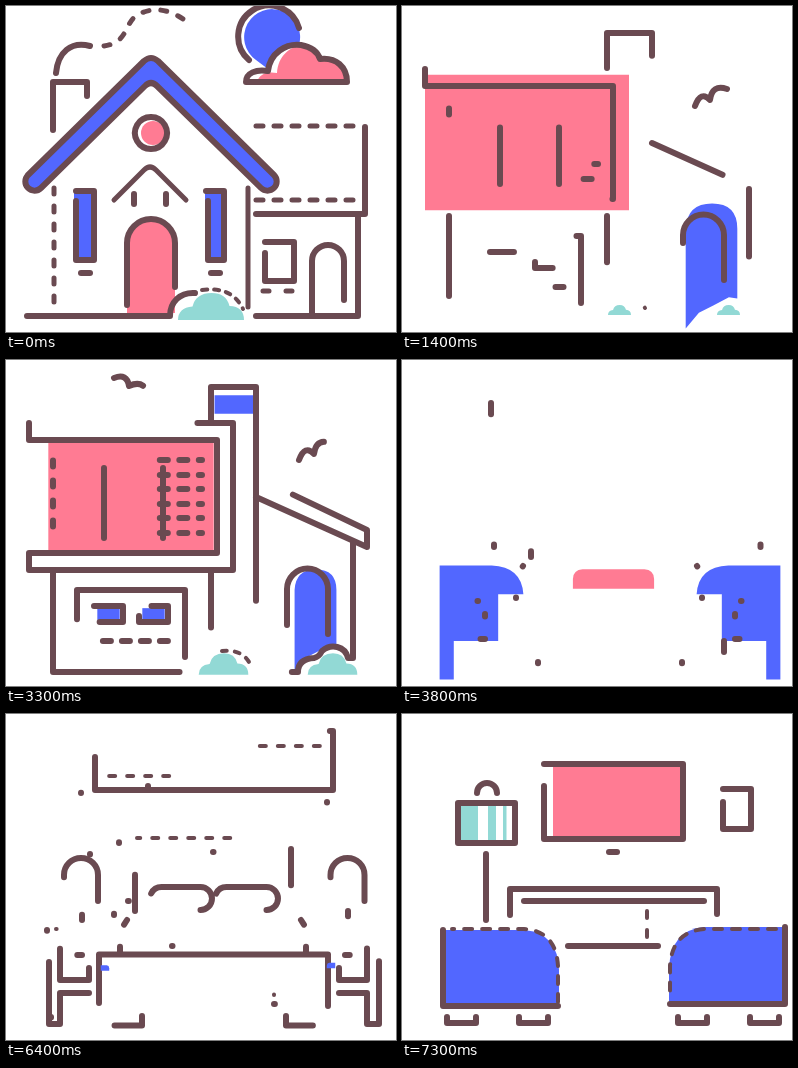
An HTML page for the animation above (8 s loop, 390 px wide and 326 px high).

```html
<!DOCTYPE html>
<html lang="en">
<head>
<meta charset="utf-8">
<title>House and home line drawings</title>
<style>
html, body { margin: 0; height: 100%; overflow: hidden; background: #fff; }
svg { display: block; width: 390px; height: 326px; }
.line { fill: none; stroke: #6a4a51; stroke-width: 6; stroke-linecap: round; stroke-linejoin: round; }
.fill { transform-box: fill-box; transform-origin: center; }
</style>
</head>
<body>
<svg id="stage" viewBox="0 0 390 326"></svg>
<script>
const PINK = '#ff7b93', BLUE = '#5267ff', TEAL = '#92d9d5';
const LOOP = 8000, STEP = 100;

// Fill: colour, path, delay against the scene's fill start
const fill = (color, d, delay = 0) => ({ color, d, delay });
// Line: path ends at the point where the stroke begins to grow
const line = (d, o = {}) => ({ d, delay: 0, dur: 900, w: 6, ...o });
const dashed = (d, on, off, o = {}) => line(d, { w: 5, dash: [on, off], ...o });

const box = (x, y, w, h) => `M${x} ${y}h${w}v${h}h${-w}Z`;
const pill = (x, y, w, h) => {
  const r = h / 2;
  return `M${x + w - r} ${y + h}H${x + r}a${r} ${r} 0 0 1 0 ${-h}H${x + w - r}a${r} ${r} 0 0 1 0 ${h}`;
};
const bush = (x, y, w, h) => {
  const p = (a, b) => `${x + a * w} ${y + b * h}`;
  return `M${p(0, 1)}Q${p(0, .55)} ${p(.22, .5)}Q${p(.27, 0)} ${p(.51, 0)}` +
    `Q${p(.73, 0)} ${p(.78, .48)}Q${p(1, .5)} ${p(1, 1)}Z`;
};
const foot = (x, delay = 60) => line(`M${x + 29} 303v6h-29v-6`, { delay });

const gable = 'M22 169L138 55Q145 49 152 55L268 169A9 9 0 0 1 255 182L151 80Q145 74 139 80L35 182A9 9 0 0 1 22 169Z';
const cottage = {
  fills: [
    fill(BLUE, 'M250 54A28 28 0 1 1 293 39C279 38 265 48 262 63Z'),
    fill(PINK, 'M251 76C253 68 261 65 271 67C272 50 284 40 296 40C306 42 312 47 314 53C330 51 341 61 341 76Z'),
    fill(BLUE, gable),
    fill(PINK, 'M135 127a12 12 0 1 0 24 0a12 12 0 1 0 -24 0Z'),
    fill(PINK, 'M121 307V237A24 24 0 0 1 169 237V307Z'),
    fill(BLUE, box(68, 187, 18, 66)),
    fill(BLUE, box(199, 187, 17, 66)),
    fill(TEAL, bush(172, 287, 66, 27))
  ],
  lines: [
    line('M84 40C65 35 52 46 50 67'),
    dashed('M98 40C126 36 116 12 138 6Q158 -1 180 15', 6, 12),
    line('M81 90V76H47V124'),
    line(gable),
    line('M145 111a16 16 0 1 1 -.1 0'),
    line('M108 194L138 164Q144 158 150 164L180 194', { w: 5 }),
    line('M128 188V198'),
    line('M160 188V198'),
    line('M121 299V237A24 24 0 0 1 169 237V281'),
    line('M70 185H88V254H70V195'),
    line('M200 185H218V254H202V195'),
    line('M75 267H84'),
    line('M205 267H214'),
    dashed('M48 182V297', 6, 12),
    line('M242 182V301', { w: 5 }),
    line('M189 287C174 286 164 296 164 310H21'),
    dashed('M196 284Q226 280 237 303', 5, 7, { w: 4 }),
    line('M243 54A31 31 0 1 1 293 22'),
    line('M341 76H240C240 67 250 63 262 65C264 47 280 37 295 39C306 41 312 47 314 53C330 51 341 61 341 76'),
    dashed('M250 120H347', 7, 11),
    dashed('M250 194H347', 7, 11),
    line('M359 121V208H250'),
    line('M352 209V310H250'),
    line('M259 236H288V275H259V247'),
    dashed('M257 285H287', 6, 17),
    line('M306 307V255A16 16 0 0 1 338 255V294')
  ]
};

const quick = { dur: 520 };
const villa = {
  fills: [
    fill(PINK, box(40, 80, 170, 113)),
    fill(BLUE, box(208, 35, 40, 19), 320),
    fill(BLUE, box(91, 248, 23, 12), 380),
    fill(BLUE, box(136, 248, 23, 12), 440),
    fill(BLUE, 'M288 312V229Q289 208 310 208Q331 208 331 229V287L324 286L311 293L299 299Z'),
    fill(TEAL, bush(192, 293, 51, 22), 140),
    fill(TEAL, bush(301, 293, 51, 22), 140)
  ],
  lines: [
    line('M23 63H227V210H23V193H211V80H23V63'),
    dashed('M47 180V94', 6, 14, { delay: 90, w: 6 }),
    line('M98 95V178', quick),
    line('M157 95V178', quick),
    ...[173, 158, 144, 129, 115, 100].map((y, i) =>
      dashed(`M146 ${y}H196`, 8, 11.5, { delay: 154 + i * 90, dur: 480, w: 6 })),
    line('M250 295V27H205V62'),
    line('M250 117L361 170V187L250 137'),
    line('M250 312H292Q292 299 308 298Q313 297 316 291C325 283 339 286 342 298L347 298V183'),
    line('M205 294C192 293 185 300 185 312H47V210'),
    line('M205 278V210', quick),
    dashed('M210 292Q234 287 243 302', 5, 8, { delay: 300, dur: 700, w: 4 }),
    line('M71 297V230H179V297'),
    line('M88 255V262H117V246H88'),
    line('M133 246H162V262H133V256'),
    dashed('M83 281H172', 8, 11, { delay: 60, w: 6 }),
    line('M281 292V229A20.5 20.5 0 0 1 322 229V274', quick),
    line('M141 31Q136 20 123 26Q121 13 108 18', { delay: 420, dur: 500 }),
    line('M325 83Q310 78 308 94Q299 84 293 100', { dur: 320 })
  ]
};

const late = { delay: 75 };
const table = 'M44.6 215H88Q113 216 114.4 239H93.4V278H56.4V310H44.6Z';
const tableRight = 'M371.4 215H328Q303 216 301.6 239H322.6V278H359.6V310H371.4Z';
const lamp = x => line(`M${x + 34} 187h-34v-26a17 17 0 0 1 34 0v26`);
const bedroom = {
  fills: [
    fill(BLUE, table),
    fill(BLUE, tableRight),
    fill(TEAL, box(131, 136, 152, 51), 290),
    fill(PINK, 'M123 240V219Q124 199 144 198H279Q299 199 300 219V240Z', 139),
    fill(BLUE, pill(146, 180, 58, 14) + 'Z', 400),
    fill(BLUE, pill(213, 180, 57, 14) + 'Z', 440)
  ],
  lines: [
    line('M89 17H327V76H89V43'),
    dashed('M210 32H316', 6, 12, { w: 4, ...late }),
    dashed('M207 62H101', 6, 12, { w: 4, ...late }),
    dashed('M290 124H131', 6, 12, { w: 4, ...late }),
    line('M129 135V197', { dur: 400 }),
    line('M285 197V135', { delay: 100, dur: 500 }),
    line(pill(144, 173, 62, 23), late),
    line(pill(209, 173, 63, 23), late),
    lamp(58), lamp(324.5),
    line('M76 197V206', late),
    line('M342 206V197', late),
    line('M116 214L121 206'),
    line('M114 229V238'),
    line('M300 214L295 206'),
    line('M300 229V238'),
    line('M105 216H43V310H54V279H83'),
    line('M310 216H373V310H361V279H333'),
    line('M98 228H54V266H83V254'),
    line('M317 228H361V266H333V254'),
    line('M68 241H76'),
    line('M347 241H339'),
    line('M322 292H93V240.5H322V292'),
    line('M93 301V311.5H136V302'),
    line('M322 301V311.5H280V302')
  ]
};

const lounge = {
  fills: [
    fill(BLUE, 'M41 216H122Q156 219 157 256V292H41Z'),
    fill(BLUE, 'M383 213V290H267V254Q269 216 302 213Z'),
    fill(PINK, box(151, 51, 129, 73), 120),
    fill(TEAL, box(59, 92, 17, 35) + box(86, 92, 8, 35) + box(101, 92, 3.5, 35), 220)
  ],
  lines: [
    line('M95 79A10 10 0 0 0 75 79'),
    line('M113 129H56V89H113V129'),
    line('M84 206V140'),
    line('M142 50H281V125H142V72'),
    line('M215 138H207'),
    line('M321 75H349V115H321V88'),
    line('M315 200V175H108V201'),
    line('M302 187H122'),
    dashed('M245 223V193', 7, 12, { w: 4, delay: 60 }),
    line('M256 232H166'),
    line('M156 292H41V216'),
    dashed('M156 288V252Q154 217 122 215H50', 8, 10, { w: 4 }),
    line('M383 213V290H268'),
    dashed('M374 215H302Q270 218 268 252V281', 8, 10, { w: 4 }),
    foot(45, 0), foot(117), foot(276), foot(348)
  ]
};

// Start of line growth, of fill growth, of the fill exit and line exit
const scenes = [
  { ...cottage, in: -3000, pop: -3000, leave: 440, out: 450, outDur: 750 },
  { ...villa, in: 1076, pop: 1160, leave: 3140, out: 3150, outDur: 600 },
  { ...bedroom, in: 3725, pop: 3560, leave: 5860, out: 5980, outDur: 950 },
  { ...lounge, in: 6365, pop: 6364, leave: 9000, out: 9000, outDur: 900 }
];

const clamp = x => Math.min(1, Math.max(0, x));
const ease = x => { x = clamp(x); return x * x * (3 - 2 * x); };
const grow = ms => ms < 240 ? 1.2 * ease(ms / 240) : 1.2 - .2 * ease((ms - 240) / 180);
const shrink = ms => ms < 110 ? 1 + .12 * ease(ms / 110) : 1.12 * (1 - ease((ms - 110) / 220));

const stage = document.getElementById('stage');
function add(cls, d) {
  const el = document.createElementNS('http://www.w3.org/2000/svg', 'path');
  el.setAttribute('class', cls);
  el.setAttribute('d', d);
  stage.append(el);
  return el;
}

for (const s of scenes) {
  for (const f of s.fills) {
    f.el = add('fill', f.d);
    f.el.style.fill = f.color;
  }
  for (const l of s.lines) {
    l.el = add('line', l.d);
    l.el.style.strokeWidth = l.w;
    l.len = l.el.getTotalLength();
  }
}

function show(el, on) {
  el.style.display = on ? '' : 'none';
  return on;
}

function drawFill(f, s, t) {
  const k = t < s.leave ? grow(t - s.pop - f.delay) : shrink(t - s.leave);
  if (show(f.el, k > .001)) f.el.style.transform = `scale(${k})`;
}

// The visible part is the last share p; dashes count from its moving tip
function drawLine(l, s, t) {
  const p = t < s.out ? ease((t - s.in - l.delay) / l.dur) : 1 - ease((t - s.out) / s.outDur);
  if (!show(l.el, p > 0)) return;
  const seen = Math.max(.5, p * l.len);
  let dashes = [seen, 9999];
  if (l.dash) {
    const n = Math.max(1, Math.ceil(seen / (l.dash[0] + l.dash[1])));
    dashes = Array(n).fill(l.dash).flat();
    dashes[dashes.length - 1] = 9999;
  }
  l.el.style.strokeDasharray = dashes.join(' ');
  l.el.style.strokeDashoffset = seen - l.len;
}

let last = -1;
const start = performance.now();
function frame() {
  const t = Math.floor(((performance.now() - start) % LOOP) / STEP) * STEP;
  if (t !== last) {
    last = t;
    for (const s of scenes) {
      s.fills.forEach(f => drawFill(f, s, t));
      s.lines.forEach(l => drawLine(l, s, t));
    }
  }
  requestAnimationFrame(frame);
}
frame();
</script>
</body>
</html>
```
